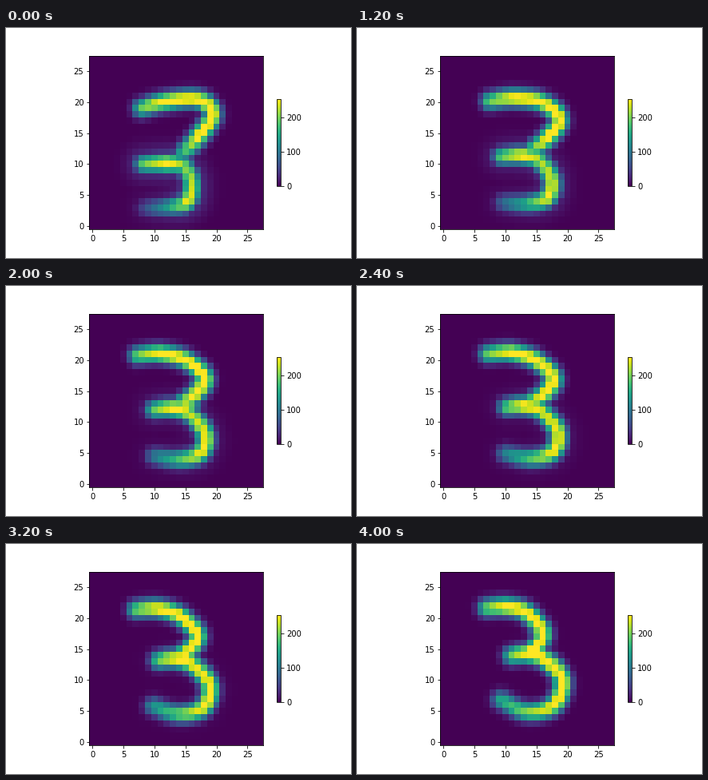
A matplotlib script for the animation above (4.2 s loop, 432 by 288 pixels).

```python
import numpy as np
import matplotlib.pyplot as plt
from matplotlib.animation import FuncAnimation

FRAMES, INTERVAL = 21, 200
SIZE, VMAX = 28, 253
W, H = 432, 288
GY, GX = np.mgrid[:SIZE, :SIZE]

plt.rcParams.update({"font.family": "DejaVu Sans", "font.size": 10})

# Pen points in cell units for the first, middle and last pose.
UPPER = np.array([
    [(8, 19), (11.5, 20), (17, 20.4), (19.4, 18), (17, 14.3), (14.5, 11.7)],
    [(7.3, 20.7), (11, 21), (15.2, 19.9), (18.1, 17), (16.4, 14.3), (14.5, 13)],
    [(7, 21.6), (10, 21.8), (13.2, 21), (15.9, 18), (15.5, 16), (14.3, 14.7)],
])
LOWER = np.array([
    [(8.3, 10), (12, 10.1), (14.7, 9.6), (16, 7), (15.3, 4), (12.5, 3.1), (8.5, 2.9)],
    [(10, 12), (13, 12.2), (15.8, 11.2), (18.2, 8), (17.4, 5), (14, 4), (10, 4.5)],
    [(11, 13.9), (13.5, 14.2), (16.5, 13.2), (19.2, 10), (17.8, 6), (13.5, 4.9), (9.3, 6.8)],
])


def pose(poses, t):
    """Each point follows a parabola through its three places."""
    first, middle, last = poses
    return ((2*t - 1) * (t - 1) * first + 4*t * (1 - t) * middle
            + t * (2*t - 1) * last)


def smooth(points, per_segment=14):
    """Catmull-Rom curve through the points."""
    p = np.vstack([points[:1], points, points[-1:]])
    u = np.linspace(0, 1, per_segment)[:, None]
    return np.vstack([
        b + .5 * u * (c - a + u * (2*a - 5*b + 4*c - d + u * (3*(b - c) + d - a)))
        for a, b, c, d in zip(p, p[1:], p[2:], p[3:])])


def stroke(points, ink_at, ink, halo=0):
    path = smooth(points)
    x, y = path.T[:, :, None, None]
    strength = np.interp(np.linspace(0, 1, len(path)), ink_at, ink)
    dist = np.hypot(GX - x, GY - y)
    profile = np.maximum(np.exp(-(dist / 1.43) ** 2.2),
                         halo * np.exp(-(dist / 2.6) ** 2))
    return (strength[:, None, None] * profile).max(axis=0)


def digit(step):
    t = step / (FRAMES - 1)
    upper = stroke(pose(UPPER, t), [0, .2, .8, 1],
                   [.75, 1.05, 1.05, .6 + .5*t])
    lower = stroke(pose(LOWER, t), [0, 1/6, 1/3, 2/3, 1],
                   [.75, 1.05, .8 + .25*t, 1 + .05*t, .2 + .4*t],
                   halo=.22 * (1 - t))
    return VMAX * np.clip(np.maximum(upper, lower), 0, 1)


def axes_at(x, y, w, h):
    return fig.add_axes([x / W, y / H, w / W, h / H])


fig = plt.figure(figsize=(W / 72, H / 72), dpi=72, facecolor="white")
ax = axes_at(104.4, 36, 217.44, 217.44)
image = ax.imshow(digit(0), cmap="viridis", vmin=0, vmax=VMAX,
                  origin="lower", interpolation="nearest")
ax.set_xticks(range(0, SIZE, 5))
ax.set_yticks(range(0, SIZE, 5))
fig.colorbar(image, cax=axes_at(338.58, 90.36, 5.44, 108.72),
             ticks=[0, 100, 200])


def update(step):
    image.set_data(digit(step))
    return [image]


anim = FuncAnimation(fig, update, frames=FRAMES, interval=INTERVAL,
                     repeat=True, repeat_delay=0)
plt.show()
```
